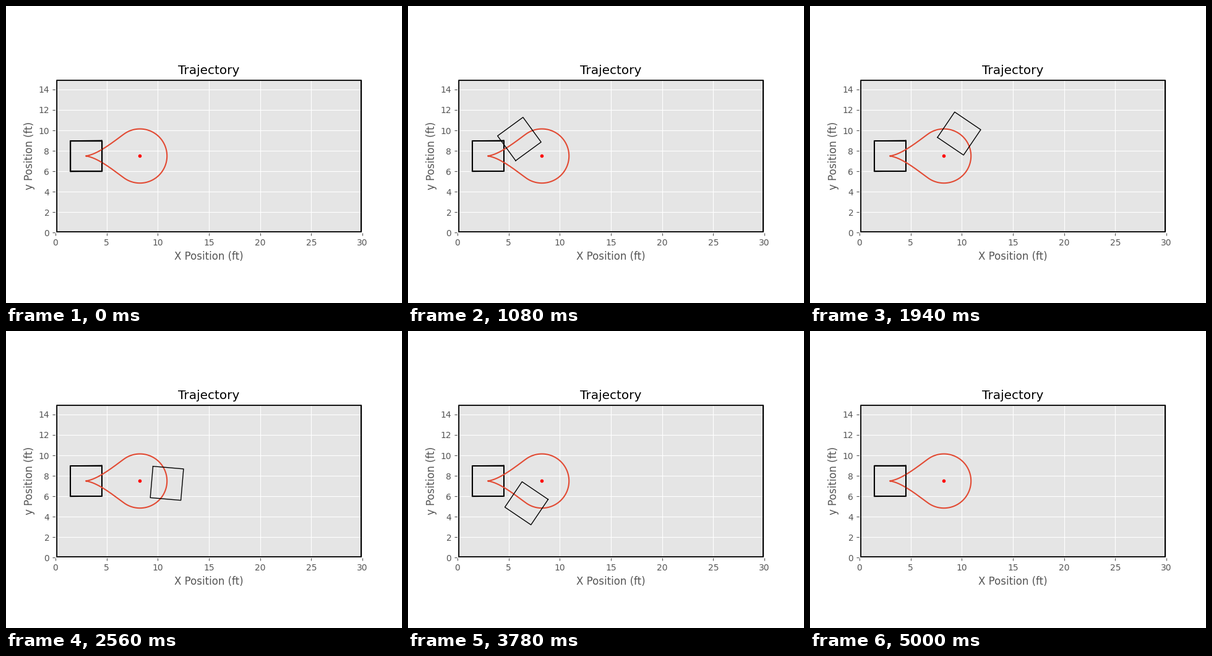
Write a matplotlib script that moves like this. It is 640 by 480 pixels and loops after 5020 ms.

```python
import numpy as np
import matplotlib.pyplot as plt
from matplotlib.animation import FuncAnimation

plt.style.use("ggplot")

FRAMES, STEP = 251, 20
TOTAL = FRAMES * STEP / 1000
HALF = TOTAL / 2
LENGTH, WIDTH = 3.08, 3.0
START = np.array([3.0, 7.5])
PIVOT = np.array([8.25, 7.5])
RADIUS = 2.65
ARC_TIME = 1.27              # moment the robot settles on the circular arc
ARC_RATE = -98.05            # degrees per second on the arc
ARC_SPEED = RADIUS * np.radians(-ARC_RATE)


def cumulate(rate, t):
    """Running trapezoid integral."""
    parts = (rate[1:] + rate[:-1]) / 2 * np.diff(t)
    return np.concatenate([[0], np.cumsum(parts)])


def first_half(n=2511):
    """Drive from the start to the far side of the pivot."""
    t = np.linspace(0, HALF, n)
    turn = np.interp(t, [0, .1, .58, 1.1, 1.17, ARC_TIME],
                     [15, 43, 43, 6, 0, ARC_RATE])
    speed = np.interp(t, [0, .1, 1.02, ARC_TIME], [0, .18, 6.53, ARC_SPEED])
    head = np.radians(cumulate(turn, t))
    x = START[0] + cumulate(speed * np.cos(head), t)
    y = START[1] + cumulate(speed * np.sin(head), t)
    # close the small gap to the arc during the approach
    ramp = np.clip(t / ARC_TIME, 0, 1)
    x += (PIVOT[0] + RADIUS - x[-1]) * ramp
    y += (PIVOT[1] - y[-1]) * ramp
    return t, x, y, head


T, X, Y, HEAD = first_half()


def pose(t):
    """Position and heading; the way back mirrors the way out."""
    back = t > HALF
    u = TOTAL - t if back else t
    x, y, head = (np.interp(u, T, v) for v in (X, Y, HEAD))
    if back:
        return x, 2 * START[1] - y, -np.pi - head
    return x, y, head


def outline(x, y, head):
    """Closed corner path of the robot body."""
    a = np.array([-1, 1, 1, -1, -1]) * LENGTH / 2
    b = np.array([-1, -1, 1, 1, -1]) * WIDTH / 2
    c, s = np.cos(head), np.sin(head)
    return x + a * c - b * s, y + a * s + b * c


fig, ax = plt.subplots(figsize=(6.4, 4.8), dpi=100)
ax.set_aspect("equal")
ax.set_xlim(0, 30)
ax.set_ylim(0, 15)
ax.set_xticks(range(0, 31, 5))
ax.set_yticks(range(0, 15, 2))
ax.set_title("Trajectory")
ax.set_xlabel("X Position (ft)")
ax.set_ylabel("y Position (ft)")

ax.plot([.1, 29.9, 29.9, .1, .1], [.1, .1, 14.9, 14.9, .1], "k", lw=1.5)
ax.plot(*PIVOT, "r.", ms=6)
ax.plot(*outline(*START, 0), "k", lw=1.5)
ax.plot(*outline(*START, np.radians(.6 - 180)), "k", lw=1)
ax.plot(np.concatenate([X, X[::-1]]),
        np.concatenate([Y, 2 * START[1] - Y[::-1]]), color="#E24A33", lw=1.5)
robot, = ax.plot([], [], "k", lw=1)


def update(i):
    robot.set_data(*outline(*pose(i * STEP / 1000)))
    return robot,


anim = FuncAnimation(fig, update, frames=FRAMES, interval=STEP,
                     repeat=True, repeat_delay=0, blit=False)
plt.show()
```
